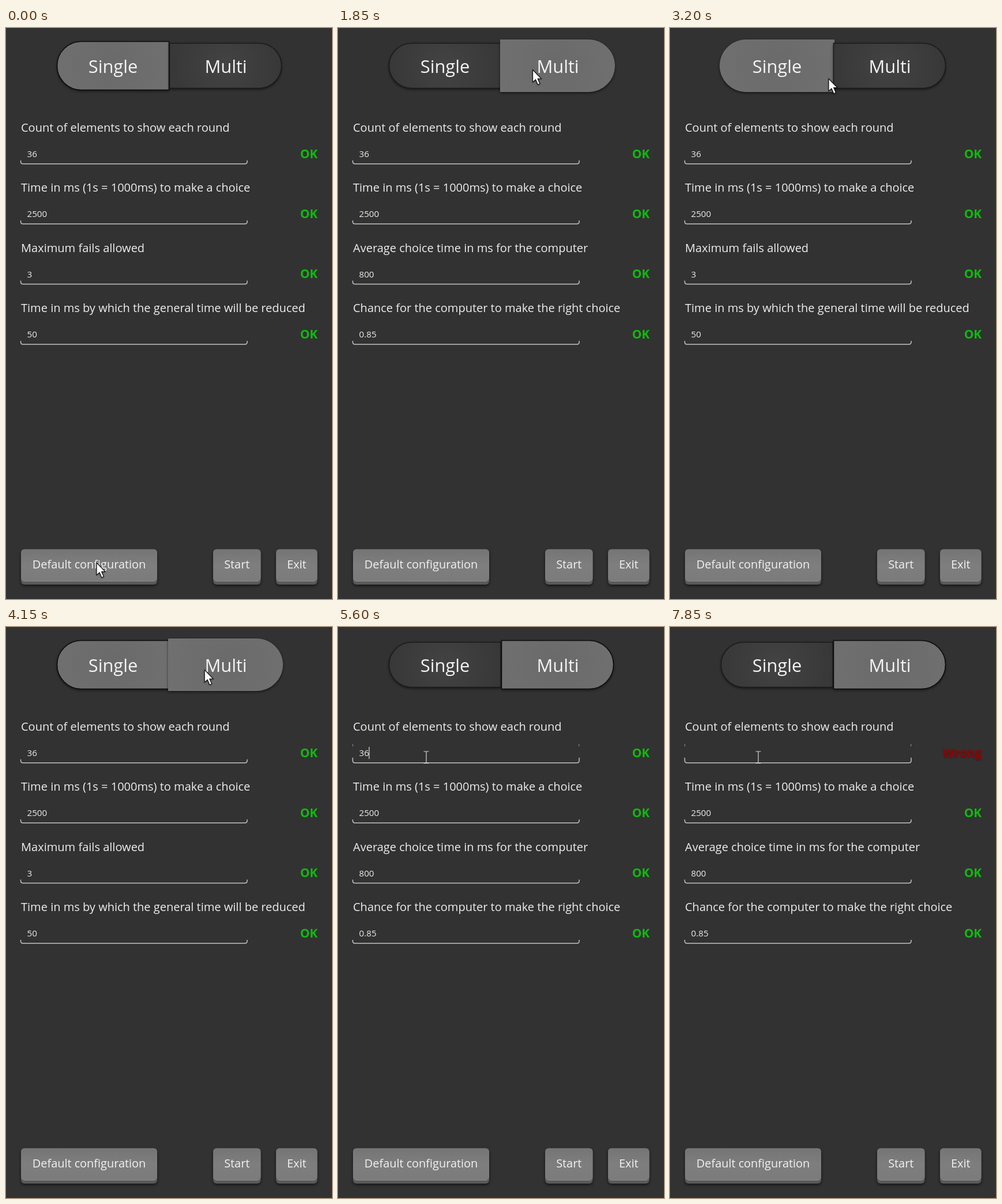
Write an HTML page with a canvas that moves like this. It is 565 px wide and 991 px high and loops after 8000 ms.

```html
<!DOCTYPE html>
<html lang="en">
<head>
<meta charset="utf-8">
<title>Game settings</title>
<style>
html, body { margin: 0; width: 100%; height: 100%; overflow: hidden; background: #323232; }
canvas { display: block; }
</style>
</head>
<body>
<canvas id="stage" width="565" height="991"></canvas>
<script>
const ctx = document.getElementById('stage').getContext('2d');
const LOOP = 8000, ROW = 104.4;
const FONT = '"Open Sans", "Noto Sans", sans-serif';

const COMMON = [['Count of elements to show each round', '36'],
                ['Time in ms (1s = 1000ms) to make a choice', '2500']];
const SINGLE = [...COMMON, ['Maximum fails allowed', '3'],
                ['Time in ms by which the general time will be reduced', '50']];
const MULTI = [...COMMON, ['Average choice time in ms for the computer', '800'],
               ['Chance for the computer to make the right choice', '0.85']];

// Pointer path: time, x, y
const PATH = [[0, 157, 928], [50, 157, 928], [850, 363, 284], [900, 365, 280], [1450, 337.5, 72.5],
              [2750, 337.5, 72.5], [3050, 275, 88], [3250, 275, 88], [3550, 240, 82], [3850, 240, 82],
              [4200, 350, 74], [4640, 350, 74], [4850, 217, 282], [5400, 153, 226], [LOOP, 153, 226]];

function pointerAt(t) {
  const i = PATH.findIndex(p => p[0] > t);
  const [t0, x0, y0] = PATH[i - 1], [t1, x1, y1] = PATH[i];
  const u = (t - t0) / (t1 - t0), e = u * u * (3 - 2 * u);
  return [x0 + (x1 - x0) * e, y0 + (y1 - y0) * e];
}

function text(str, x, y, size, color = '#ededed', align = 'left', weight = 400) {
  ctx.font = `${weight} ${size}px ${FONT}`;
  ctx.textAlign = align;
  ctx.fillStyle = color;
  ctx.fillText(str, x, y);
}

function box(x, y, w, h, radii) {
  ctx.beginPath();
  ctx.roundRect(x, y, w, h, radii);
}

function shadow(blur, dy, color = 'rgba(0,0,0,.65)') {
  ctx.shadowBlur = blur;
  ctx.shadowOffsetY = dy;
  ctx.shadowColor = color;
}

function noShadow() {
  shadow(0, 0, 'transparent');
}

function glow(cx, cy, r, inner, outer) {
  const g = ctx.createRadialGradient(cx, cy, 0, cx, cy, r);
  g.addColorStop(0, inner);
  g.addColorStop(1, outer);
  return g;
}

function tab(label, right, selected, hover) {
  const dx = hover ? 2 : 0, dy = hover ? 6 : selected ? 3 : 0;
  const x = (right ? 283.5 : 88.5) - dx, y = 26.5 - dy;
  const w = 194 + 2 * dx, h = 78 + 2 * dy, r = h / 2;
  const lit = selected || hover;
  box(x, y, w, h, right ? [0, r, r, 0] : [r, 0, 0, r]);
  ctx.fillStyle = lit ? glow(x + w / 2, 65, 110, '#6a6a6a', '#707070')
                      : glow(x + w / 2, 65, 105, '#434343', '#373737');
  shadow(5, 2);
  ctx.fill();
  noShadow();
  ctx.lineWidth = hover ? 1 : 1.6;
  ctx.strokeStyle = hover ? '#747474' : selected ? '#0c0c0c' : '#1b1b1b';
  ctx.stroke();
  text(label, right ? 381 : 185.5, 77.5, 30.8, '#f4f4f4', 'center');
}

function field(i, [label, value], status, active) {
  const y = i * ROW;
  text(label, 26, 180 + y, 20);
  text(value, 36.5, 224 + y, 15.2);
  const base = 235.7 + y, side = base - (active ? 9 : 6);
  ctx.strokeStyle = '#c4c4c4';
  ctx.lineWidth = 1.5;
  ctx.beginPath();
  ctx.moveTo(25.5, side);
  ctx.lineTo(25.5, base - 4);
  ctx.quadraticCurveTo(25.5, base, 29.5, base);
  ctx.lineTo(414, base);
  ctx.quadraticCurveTo(418, base, 418, base - 4);
  ctx.lineTo(418, side);
  ctx.stroke();
  if (active) {
    ctx.fillStyle = '#858585';
    ctx.fillRect(25, base - 32.5, 1.2, 4);
    ctx.fillRect(417, base - 32.5, 1.2, 4);
  }
  const ok = status === 'OK';
  if (!ok) shadow(3, 1, 'rgba(0,0,0,.35)');
  text(status, 540, 225.5 + y, 20.8, ok ? '#0cbd0c' : '#940000', 'right', 700);
  noShadow();
}

function button(label, x, w) {
  box(x, 905, w, 61, 6);
  ctx.fillStyle = '#595959';
  shadow(5, 2);
  ctx.fill();
  noShadow();
  box(x, 904.5, w, 56, 6);
  const g = ctx.createLinearGradient(0, 905, 0, 960);
  g.addColorStop(0, '#757575');
  g.addColorStop(.5, '#7e7e7e');
  g.addColorStop(1, '#7b7b7b');
  ctx.fillStyle = g;
  ctx.fill();
  ctx.fillStyle = '#8a8a8a';
  ctx.fillRect(x + 4, 959.5, w - 8, 1);
  text(label, x + w / 2, 938, 19.9, '#f2f2f2', 'center');
}

const ARROW = new Path2D('M0 0V21.5L5 17L8.8 25.8L12.4 24.2L8.7 15.7H15Z');
const BEAM = new Path2D('M-4.5 -10H-1Q0 -10 0 -9Q0 -10 1 -10H4.5M0 -9V9M-4.5 10.3H-1Q0 10.3 0 9Q0 10.3 1 10.3H4.5');

function pointer(x, y, beam) {
  ctx.save();
  ctx.translate(x, y);
  ctx.lineWidth = 1.2;
  if (beam) {
    ctx.strokeStyle = '#d4d4d4';
    ctx.stroke(BEAM);
  } else {
    shadow(3, 1);
    ctx.fillStyle = '#fff';
    ctx.fill(ARROW);
    noShadow();
    ctx.strokeStyle = '#111';
    ctx.stroke(ARROW);
  }
  ctx.restore();
}

function draw(t) {
  const [px, py] = pointerAt(t);
  const multi = t >= 1600 && t < 3150 || t >= 4400;
  // The hover look lingers briefly after the pointer leaves
  const leaving = t >= 4650 && t < 4900;
  const onTabs = py > 20 && py < 110;
  const hoverMulti = leaving || onTabs && px > 283;
  const hoverSingle = onTabs && !hoverMulti;
  const focused = t >= 5450;
  const count = t < 6900 ? '36' : t < 7200 ? '3' : '';
  const hoverRow = [0, 1, 2, 3].findIndex(i =>
    px > 25 && px < 418 && py > 202 + i * ROW && py < 236 + i * ROW);

  ctx.fillStyle = '#323232';
  ctx.fillRect(0, 0, 565, 991);
  tab('Single', false, !multi, hoverSingle);
  tab('Multi', true, multi, hoverMulti);

  (multi ? MULTI : SINGLE).forEach(([label, value], i) => {
    const shown = i ? value : count;
    field(i, [label, shown], shown ? 'OK' : 'Wrong', i === hoverRow || !i && focused);
  });

  // The caret blinks from the last key press
  const since = t >= 7200 ? 7200 : t >= 6900 ? 6900 : 5550;
  if (focused && Math.floor((t - since) / 500) % 2 === 0) {
    ctx.fillStyle = '#d8d8d8';
    ctx.fillRect(36 + count.length * 8.7, 208, 1.2, 21);
  }

  button('Default configuration', 26, 236);
  button('Start', 359, 82.5);
  button('Exit', 468, 71.5);
  pointer(px, py, hoverRow >= 0);
}

const start = performance.now();
function tick() {
  draw((performance.now() - start) % LOOP);
  requestAnimationFrame(tick);
}
tick();
</script>
</body>
</html>
```
